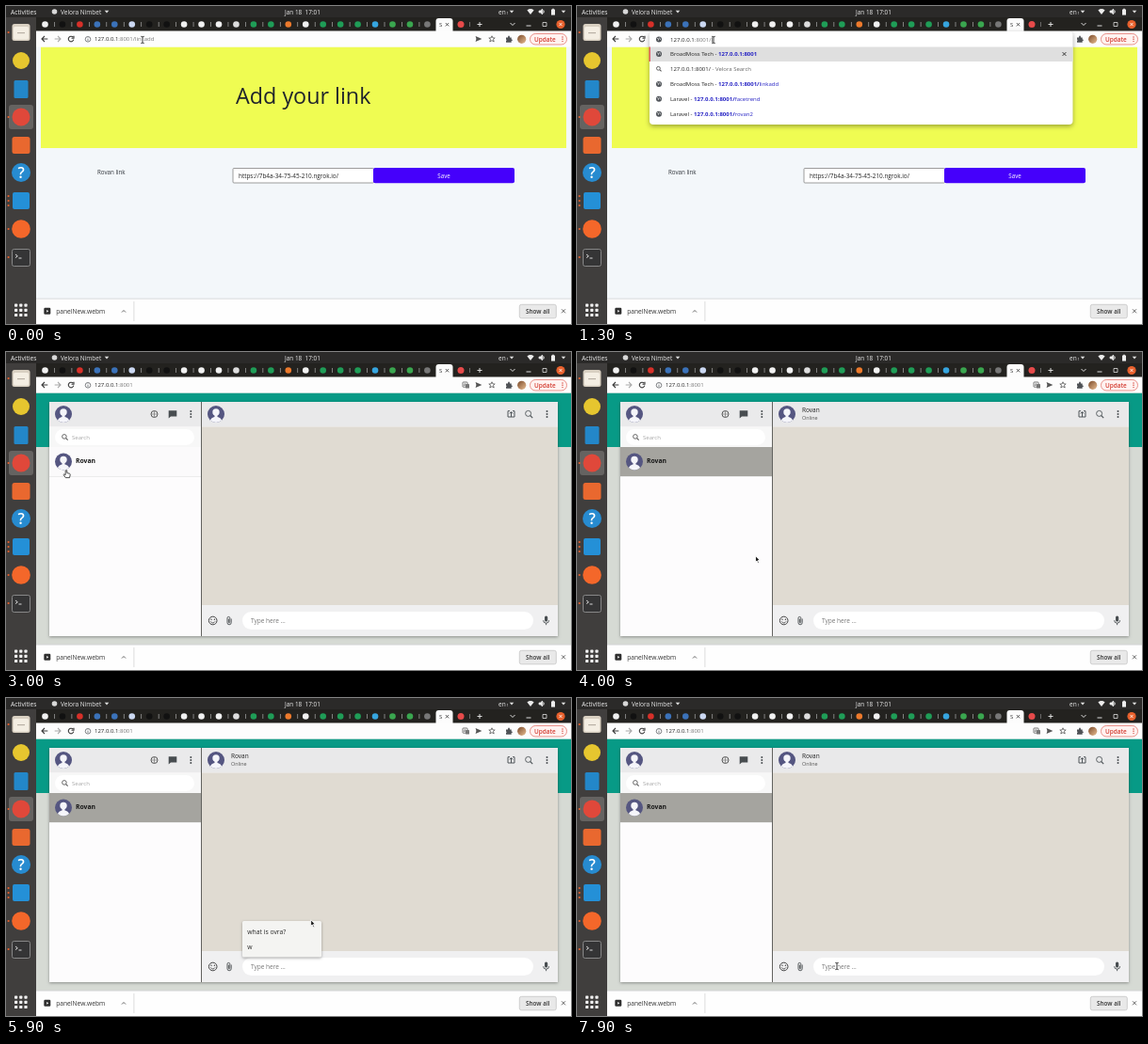
Recreate the animation shown at these times as an HTML page with a canvas. Size 600 by 338 pixels, loop 8 s.

```html
<!DOCTYPE html>
<html lang="en">
<head>
<meta charset="utf-8">
<title>Chat demo</title>
<style>
html, body { margin: 0; width: 100%; height: 100%; overflow: hidden; }
canvas { display: block; width: 600px; height: 338px; }
</style>
</head>
<body>
<canvas id="stage" width="600" height="338"></canvas>
<script>
const ctx = document.getElementById('stage').getContext('2d');
const LOOP = 8000;
const CONTACT = 'Rovan';
const DARK = '#3c3c3c';

// Times at which the screen changes
const T = { erase: 700, submit: 1900, loaded: 2500, select: 3400, popup: 4450, fade: 6650 };

// Pointer stops: time, x, y
const POINTER = [
  [0, 145, 36], [2250, 145, 36], [2850, 64, 126], [3700, 64, 126],
  [4250, 284, 285], [4500, 284, 285], [4800, 289, 256], [5600, 289, 256],
  [6350, 387, 199], [6950, 387, 199], [7650, 276, 285], [LOOP, 276, 285]
];

function rect(x, y, w, h, fill) {
  ctx.fillStyle = fill;
  ctx.fillRect(x, y, w, h);
}

function box(x, y, w, h, r, fill, stroke, lw = 0.8) {
  ctx.beginPath();
  ctx.roundRect(x, y, w, h, r);
  paint(fill, stroke, lw);
}

function paint(fill, stroke, lw) {
  if (fill) { ctx.fillStyle = fill; ctx.fill(); }
  if (stroke) { ctx.strokeStyle = stroke; ctx.lineWidth = lw; ctx.stroke(); }
}

function circle(x, y, r, fill, stroke, lw = 1) {
  ctx.beginPath();
  ctx.arc(x, y, r, 0, Math.PI * 2);
  paint(fill, stroke, lw);
}

// Strokes an SVG-style path placed at x, y
function path(x, y, d, stroke, lw = 1, fill) {
  const p = new Path2D(d);
  ctx.save();
  ctx.translate(x, y);
  if (fill) { ctx.fillStyle = fill; ctx.fill(p); }
  if (stroke) { ctx.strokeStyle = stroke; ctx.lineWidth = lw; ctx.stroke(p); }
  ctx.restore();
}

function text(str, x, y, size, color, weight = 400, align = 'left') {
  ctx.font = `${weight} ${size}px "Open Sans", "Noto Sans", sans-serif`;
  ctx.textAlign = align;
  ctx.fillStyle = color;
  ctx.fillText(str, x, y);
  return x + ctx.measureText(str).width;
}

function shadow(blur, dy, draw) {
  ctx.save();
  ctx.shadowColor = 'rgba(0,0,0,.35)';
  ctx.shadowBlur = blur;
  ctx.shadowOffsetY = dy;
  draw();
  ctx.restore();
}

const cross = (x, y, r, color, lw = 1) =>
  path(x, y, `M${-r} ${-r}L${r} ${r}M${r} ${-r}L${-r} ${r}`, color, lw);
const caret = (x, y, color) => path(x, y, 'M-2.3 -1.2H2.3L0 1.5Z', null, 0, color);
const dots = (x, y, gap, r, color) => {
  for (let i = -1; i < 2; i++) circle(x, y + i * gap, r, color);
};

function globe(x, y) {
  circle(x, y, 3, '#4d5156');
  path(x, y, 'M-2 -1.3L-.3 -.6L-.8 1.3M.8 -2.2L1 -.4L2.2 .7', '#e4e4e4', 0.8);
}

function lens(x, y, r, color) {
  circle(x - 0.6, y - 0.6, r, null, color, 0.9);
  path(x, y, `M${r * 0.5} ${r * 0.5}L${r * 1.35} ${r * 1.35}`, color, 1.1);
}

function avatar(x, y) {
  ctx.save();
  circle(x, y, 9, '#555681');
  ctx.clip();
  circle(x, y - 2, 3.7, '#f5f5fa');
  ctx.beginPath();
  ctx.ellipse(x, y + 8, 6.3, 5.2, 0, 0, Math.PI * 2);
  paint('#f5f5fa');
  rect(x - 1.5, y, 3, 4, '#f5f5fa');
  ctx.restore();
}

function panel() {
  rect(0, 0, 600, 12, '#2b2a29');
  text('Activities', 5, 8.6, 6.7, '#eee');
  circle(51.5, 6, 2.8, '#d8d8d8');
  text('Velora Nimbet', 58, 8.6, 6.5, '#e8e8e8');
  caret(107, 6, '#ddd');
  text('Jan 18  17:01', 315, 8.6, 6.4, '#eee', 400, 'center');
  text('en', 523, 8.6, 6.5, '#eee');
  text('1', 531.5, 9.3, 4, '#eee');
  caret(537, 6, '#ddd');
  path(557, 6, 'M-3.6 -1.6Q0 -4.4 3.6 -1.6L0 3Z', null, 0, '#eee');
  path(569, 6, 'M-3 -1H-1.4L.6 -3V3L-1.4 1H-3ZM1.6 -1.8Q3.2 0 1.6 1.8', '#eee', 0.7, '#eee');
  rect(579, 3.6, 4, 6, '#eee');
  rect(580, 2.8, 2, 1, '#eee');
  caret(592, 6, '#ddd');
}

function dock() {
  rect(0, 12, 32, 326, '#403e3d');
  box(3, 105, 26, 26, 3, '#656361');
  box(6.5, 19, 19, 18, 2.5, '#d9d0c2');
  box(8, 22, 16, 13.5, 1.5, '#f4eee3');
  rect(12, 28, 8, 1.2, '#b9b0a5');
  circle(16, 58, 9, '#e6c62f');
  box(8.5, 79, 15, 19, 1.5, '#2387c9');
  circle(16, 118, 9.5, '#e0483a');
  box(6.5, 139, 19, 18, 2.5, '#e9682f');
  circle(16, 177, 10, '#278bd0');
  text('?', 16, 183, 16, '#fff', 600, 'center');
  box(7, 198, 18, 18, 2, '#2490d7');
  circle(16, 237, 9.8, '#f4672a');
  box(6.5, 258.5, 19, 18, 2, '#353536', '#888', 1);
  path(10, 264, 'M0 0L2.3 1.8L0 3.6M3.5 4H6.5', '#eee', 0.9);
  for (const y of [28, 118, 237, 267]) circle(2.6, y, 1.1, '#e9602c');
  dots(2.6, 207, 5, 1.1, '#e9602c');
  for (let i = 0; i < 9; i++)
    box(9 + (i % 3) * 5.2, 316.5 + Math.floor(i / 3) * 5.2, 3.2, 3.2, 0.7, '#f0f0f0');
}

function tabs() {
  rect(32, 12, 568, 15, '#23221f');
  const W = '#f1f1f1', G = '#1f9d57', B = '#3b72b9', K = '#111';
  const icons = [W, K, '#d73029', B, B, '#cbd8f2', K, K, W, W, W, '#ddd', G, G,
    '#ed7a2c', W, G, G, G, '#36a5df', '#3aa64f', '#3aa64f', '#777'];
  icons.forEach((color, i) => {
    const x = 41.5 + i * 18.45;
    circle(x, 19.5, 3.3, color);
    if (i < 22) rect(x + 9.6, 17, 0.7, 5, '#aaa');
  });
  box(456.5, 13, 18, 14.5, [3, 3, 0, 0], '#fcfcfc');
  text('S', 460, 22, 6, '#333');
  cross(468.5, 19.7, 1.7, '#333', 0.8);
  circle(483, 19.5, 3.5, '#e64a4a');
  rect(492, 17, 0.7, 5, '#888');
  path(503, 19.5, 'M-2.5 0H2.5M0 -2.5V2.5', '#ddd');
  path(538, 19, 'M-2.5 -1L0 1.5L2.5 -1', '#ddd');
  path(555, 20, 'M-2.5 1H2.5', '#ddd');
  path(572, 19.5, 'M-2 -2H2V2H-2Z', '#ddd', 0.8);
  circle(589, 19.5, 4.6, '#e8602c');
  cross(589, 19.5, 1.6, '#fff', 0.8);
}

function toolbar(t) {
  const typing = t >= T.erase && t < T.submit;
  rect(32, 26.5, 568, 17, '#fdfdfd');
  path(41, 35, 'M3.3 0H-3M0 -3L-3 0L0 3', DARK, 1.1);
  path(55, 35, 'M-3.3 0H3M0 -3L3 0L0 3', '#aaa', 1.1);
  if (t >= T.submit && t < T.loaded) cross(69, 35, 2.5, DARK, 1.1);
  else path(69, 35, 'M2.2 -1.8A2.8 2.8 0 1 0 2.8 .7M3 -3.2V-.7H.5', DARK, 1.1);

  if (t >= T.loaded) {
    box(485, 32, 5, 5.2, 0.6, null, '#555');
    text('A', 486, 36.4, 4, '#555');
    box(488, 34, 4, 4.6, 0.6, '#777');
  }
  path(502, 35, 'M-3.4 -3L3.4 0L-3.4 3L-2.6 0Z', null, 0, '#555');
  path(516, 35, 'M0 -3.2L1 -1H3.2L1.5 .5L2.2 3L0 1.6L-2.2 3L-1.5 .5L-3.2 -1H-1Z', '#555', 0.8);
  path(534, 35.5, 'M-3 -2H-1Q-1 -4 0 -4T1 -2H2.7V0Q4 0 4 .8T2.7 1.6V3.2H-3V1.4Q-1.5 1 -3 0Z', null, 0, '#4e5155');
  const tone = ctx.createLinearGradient(543, 31, 552, 40);
  tone.addColorStop(0, '#7a4b2b');
  tone.addColorStop(1, '#e8bd92');
  circle(547.7, 35.3, 4.6, tone);
  box(556.5, 29.5, 39, 11.5, 5.7, '#fff3f1', '#e57970');
  text('Update', 561, 37.6, 6.4, '#d33a2f', 600);
  dots(591, 35.3, 2.3, 0.7, '#d33a2f');

  if (typing) return suggestions(t);
  circle(87, 35.3, 2.8, null, '#5f6368', 0.8);
  path(87, 35.3, 'M0 -.3V1.6M0 -1.6V-.9', '#5f6368', 0.8);
  const end = text('127.0.0.1', 94, 37.4, 6, '#222');
  text(':8001' + (t < T.submit ? '/linkadd' : ''), end, 37.4, 6, '#777');
}

function suggestions(t) {
  shadow(5, 2, () => box(77, 27, 449.5, 99, 4, '#fff'));
  rect(77, 43.5, 449.5, 15.5, '#dfdfdf');
  rect(76.5, 43.5, 1.4, 15.5, '#e5535a');
  globe(87, 35.5);
  const left = Math.max(0, 7 - Math.floor((t - T.erase) / 65));
  let end = text('127.0.0.1', 99, 37.6, 6.1, '#222');
  end = text(':8001/' + 'linkadd'.slice(0, left), end, 37.6, 6.1, '#777');
  if (Math.floor(t / 500) % 2 === 0) rect(end + 0.5, 32, 0.6, 7, '#333');

  const rows = [
    ['BroadMoss Tech', '127.0.0.1:8001', ''], null,
    ['BroadMoss Tech', '127.0.0.1:8001/', 'linkadd'],
    ['Laravel', '127.0.0.1:8001/', 'facetrend'],
    ['Laravel', '127.0.0.1:8001/', 'rovan2']
  ];
  rows.forEach((row, i) => {
    const y = 53.3 + i * 15.9;
    if (!row) {
      lens(87, y - 2.3, 1.9, '#555');
      const x = text('127.0.0.1:8001/', 99, y, 6, '#222');
      text(' - Velora Search', x, y, 6, '#666');
      return;
    }
    globe(87, y - 2.2);
    let x = text(row[0] + ' - ', 99, y, 6, '#222');
    x = text(row[1], x, y, 6, '#2522c4', 700);
    text(row[2], x, y, 6, '#2522c4');
  });
  cross(517.5, 51, 1.9, '#333', 1);
}

function linkPage() {
  rect(32, 43, 568, 268, '#f3f7fa');
  rect(37, 43.5, 558, 107.5, '#effc52');
  text('Add your link', 315.7, 104, 23.3, '#20242c', 400, 'center');
  text(CONTACT + ' link', 97, 179.3, 6.2, '#30343a');
  box(241, 172.5, 149.5, 15.5, 1, '#fff', '#858585');
  text('https://7b4a-34-75-45-210.ngrok.io/', 247, 182.6, 6.4, '#222');
  box(390, 172, 150, 16.3, 2, '#4500fb');
  text('Save', 465, 182.5, 6.2, '#fff', 400, 'center');
}

function chatPage(t, pointer) {
  const selected = t >= T.select;
  rect(32, 43, 568, 268, '#d6dad4');
  rect(32, 43.5, 568, 57.5, '#079a86');
  shadow(3, 1, () => rect(46, 53, 540, 249, '#fdfcfd'));

  rect(46, 53, 161, 26.5, '#eaeaeb');
  avatar(61, 66);
  circle(157.5, 66, 3.5, null, '#555', 1);
  path(157.5, 66, 'M-3 0H3M0 -3V3', '#777', 0.7);
  path(177, 66, 'M-4.3 -3.8H4.3V2.4H-2L-4.3 4.4Z', null, 0, '#484d50');
  dots(196.3, 66, 3, 1, '#484d50');
  rect(46, 79.5, 161, 21.5, '#f7f7f7');
  box(52, 82, 148, 17, 8.5, '#fff');
  lens(62.5, 90.5, 2.3, '#555');
  text('Search', 70, 92.8, 6, '#a6a6a6');
  rect(46, 101, 161, 31, selected ? '#a5a49f' : '#fbfafb');
  rect(46, 132, 161, 0.7, '#e6e6e6');
  avatar(61, 116.5);
  text(CONTACT, 74, 117.8, 6.8, '#161616', 700);

  rect(208, 53, 378, 26.5, '#e9e9ea');
  avatar(223, 66);
  if (selected) {
    text(CONTACT, 239, 64.3, 6.5, '#222');
    text('Online', 239, 72, 5.4, '#555');
  }
  path(536.5, 66, 'M-1.5 -3.3H-3.5V3H3.5V-3.3H1.5M0 3V-2M-1.7 -.6L0 -2.4L1.7 -.6', '#50565a', 1);
  lens(555.2, 66, 3, '#50565a');
  dots(574.5, 66, 3, 1, '#484d50');
  rect(208, 79.5, 378, 190, '#e0dbd2');
  rect(208, 269, 378, 33, '#f0f0f1');
  rect(207, 53, 1, 249, '#62625f');

  const preview = t >= T.popup && t < T.fade && inside(pointer, 251, 256, 84, 16);
  circle(219.7, 285.5, 4.3, null, '#444', 1);
  circle(218, 284.2, 0.7, '#444');
  circle(221.4, 284.2, 0.7, '#444');
  path(219.7, 286.4, 'M-2.3 0Q0 3.2 2.3 0', '#444', 0.9);
  path(237, 285.5, 'M2.2 -2V2.2A2.1 2.1 0 0 1 -2 2.2V-2.7A1.4 1.4 0 0 1 .8 -2.7V1.8A.6 .6 0 0 1 -.6 1.8V-1.8', '#484d50', 0.9);
  box(251, 276, 309, 19, 9.5, preview ? '#e5ebf9' : '#fff');
  if (preview) text('w', 260, 288, 6.4, '#222');
  else text('Type here ...', 260, 288, 6.5, '#777');
  box(572, 280.5, 3.2, 6, 1.6, '#484d50');
  path(573.6, 285.2, 'M-3 0A3 3 0 0 0 3 0M0 3V5', '#484d50', 0.9);

  if (t >= T.popup && t < T.fade + 200) history(t, preview);
}

function history(t, preview) {
  ctx.save();
  ctx.globalAlpha = Math.min(1, 1 - (t - T.fade) / 200);
  shadow(3, 1, () => box(251, 237, 84, 38.5, 1.5, '#f4f4f2'));
  if (preview) rect(251, 256, 84, 16, '#d9dbd8');
  text('what is ovra?', 256.3, 250.5, 6.8, '#2a2a2a', 500);
  text('w', 256.3, 266.7, 6.8, '#2a2a2a', 500);
  ctx.restore();
}

function downloads() {
  rect(32, 311, 568, 27, '#fefefe');
  rect(32, 310.7, 568, 0.8, '#cfd1d3');
  box(40.3, 320.8, 7, 7, 1.2, '#303030');
  path(43.2, 324.3, 'M0 -1.4L2 0L0 1.4Z', null, 0, '#fff');
  text('panelNew.webm', 53.2, 326.9, 6.7, '#333');
  path(125, 324.5, 'M-2 1L0 -1L2 1', '#555', 0.9);
  rect(135.5, 314, 0.8, 21, '#d3d3d3');
  box(545.3, 317.3, 39, 14.5, 2, '#e9e9e9', '#c6c6c6');
  text('Show all', 564.7, 326.8, 6.4, '#333', 600, 'center');
  cross(592, 324.3, 2, '#555', 0.9);
}

function inside(p, x, y, w, h) {
  return p.x >= x && p.x < x + w && p.y >= y && p.y < y + h;
}

function pointerAt(t) {
  const i = POINTER.findIndex(stop => stop[0] > t);
  const [t0, x0, y0] = POINTER[i - 1];
  const [t1, x1, y1] = POINTER[i];
  const u = (t - t0) / (t1 - t0);
  const k = u * u * (3 - 2 * u);
  return { x: x0 + (x1 - x0) * k, y: y0 + (y1 - y0) * k };
}

function drawPointer(p, t) {
  const chat = t >= T.loaded;
  if (inside(p, 90, 27, 390, 16) || (chat && inside(p, 251, 276, 309, 19))) {
    const beam = 'M-1.7 -3.7Q0 -3.7 0 -2.6Q0 -3.7 1.7 -3.7M0 -2.6V2.6M-1.7 3.7Q0 3.7 0 2.6Q0 3.7 1.7 3.7';
    path(p.x, p.y, beam, '#fff', 2);
    path(p.x, p.y, beam, '#222', 0.9);
  } else if (chat && inside(p, 46, 101, 161, 31)) {
    path(p.x, p.y, 'M-.8 0Q0 -1 .8 0V2.6L3.6 3.3Q4.4 3.6 4.2 4.6L3.5 7.6H-.7L-3 4.5Q-2.6 3.2 -.8 4.6Z', '#222', 0.8, '#fff');
  } else {
    path(p.x, p.y, 'M0 0V6.6L1.5 5.2L2.6 7.8L3.8 7.3L2.7 4.8H4.8Z', '#fff', 0.9, '#151515');
  }
}

function render(t) {
  const pointer = pointerAt(t);
  if (t < T.loaded) linkPage();
  else chatPage(t, pointer);
  panel();
  tabs();
  toolbar(t);
  downloads();
  dock();
  drawPointer(pointer, t);
}

const start = performance.now();
function tick() {
  render((performance.now() - start) % LOOP);
  requestAnimationFrame(tick);
}
tick();
</script>
</body>
</html>
```
